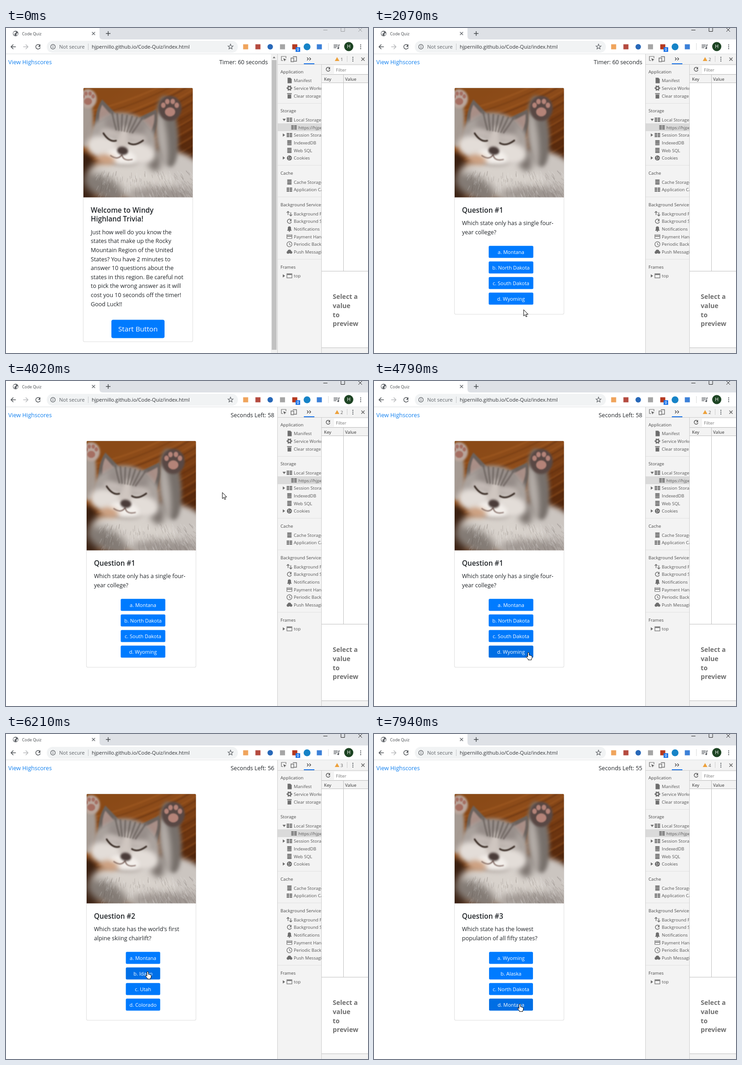
Animation, 790 px wide and 709 px high, one loop 8000 ms. Source, as an HTML page with a canvas:

```html
<!DOCTYPE html>
<html lang="en">
<head>
<meta charset="utf-8">
<title>Code Quiz</title>
<style>
html, body { margin: 0; width: 100%; height: 100%; overflow: hidden; background: #fff; }
canvas { display: block; }
</style>
</head>
<body>
<canvas id="stage" width="790" height="709"></canvas>
<script>
const LOOP = 8000, START = 1990, FIRST_SECOND = 3010;
const INK = '#212529', GREY = '#6e6e6e', CHROME = '#5f6368', PANEL = '#f3f3f3', RULE = '#cdcdcd';
const BODY = 12.55, HEADING = 15.3, LEADING = 19.6, UI = 9.65;
let c = document.getElementById('stage').getContext('2d');

const INTRO = ['Just how well do you know the', 'states that make up the Rocky', 'Mountain Region of the United',
  'States? You have 2 minutes to', 'answer 10 questions about the', 'states in this region. Be careful not',
  'to pick the wrong answer as it will', 'cost you 10 seconds off the timer!', 'Good Luck!!'];
const QUESTIONS = [
  { at: START, lines: ['Which state only has a single four-', 'year college?'],
    answers: ['a. Montana', 'b. North Dakota', 'c. South Dakota', 'd. Wyoming'] },
  { at: 5450, lines: ["Which state has the world's first", 'alpine skiing chairlift?'],
    answers: ['a. Montana', 'b. Idaho', 'c. Utah', 'd. Colorado'] },
  { at: 6540, lines: ['Which state has the lowest', 'population of all fifty states?'],
    answers: ['a. Wyoming', 'b. Alaska', 'c. North Dakota', 'd. Montana'] }
];
const MOVES = [
  { from: 280, to: 1050, x: 312, y: 649, bow: 70 },
  { from: START, to: 2780, x: 528, y: 118 },
  { from: 2780, to: 3010, x: 527, y: 79 },
  { from: 3220, to: 3410, x: 529, y: 94 },
  { from: 3560, to: 4730, x: 337, y: 592 },
  { from: 4800, to: 5040, x: 322, y: 588 },
  { from: 5700, to: 6210, x: 309, y: 518 },
  { from: 7290, to: 7940, x: 318, y: 589 }
];

const asked = t => QUESTIONS.filter(q => t >= q.at).length;

function pointer(t) {
  if (t < MOVES[0].from) return null;
  let p = { x: 654, y: 698 };
  for (const m of MOVES) {
    const u = Math.min(1, Math.max(0, (t - m.from) / (m.to - m.from)));
    const k = u * (.6 + .4 * u);
    p = { x: p.x + (m.x - p.x) * k, y: p.y + (m.y - p.y) * k - (m.bow || 0) * Math.sin(Math.PI * k) };
  }
  return p;
}

const within = (p, b) => p && p.x >= b.x && p.x < b.x + b.w && p.y + 3 >= b.y && p.y + 3 < b.y + b.h;

// Share of the last 150 ms that the pointer spent on the button
function hoverLevel(b, t) {
  let hits = 0;
  for (let i = 0; i < 10; i++) hits += within(pointer(t - i * 15), b) ? 1 : 0;
  return hits / 10;
}

function font(size, weight = 400) { c.font = `${weight} ${size}px "Open Sans", "Noto Sans", sans-serif`; }
function text(s, x, y, size, color = INK, weight = 400, align = 'left') {
  font(size, weight);
  c.fillStyle = color;
  c.textAlign = align;
  c.fillText(s, x, y);
}
function lines(list, x, y, size, color, weight) {
  list.forEach((s, i) => text(s, x, y + i * LEADING, size, color, weight));
}
function rect(x, y, w, h, color) { c.fillStyle = color; c.fillRect(x, y, w, h); }
function pill(x, y, w, h, r, color) { c.beginPath(); c.roundRect(x, y, w, h, r); c.fillStyle = color; c.fill(); }
function disc(x, y, r, color) { c.beginPath(); c.arc(x, y, r, 0, 7); c.fillStyle = color; c.fill(); }
function shape(d, x, y, fill, stroke, width = 1) {
  const p = new Path2D(d);
  c.save();
  c.translate(x, y);
  if (fill) { c.fillStyle = fill; c.fill(p); }
  if (stroke) { c.strokeStyle = stroke; c.lineWidth = width; c.stroke(p); }
  c.restore();
}
const line = (d, x, y, color, width = 1.4) => shape(d, x, y, null, color, width);
function cross(x, y, r, color, width) { line(`M${-r} ${-r}L${r} ${r}M${r} ${-r}L${-r} ${r}`, x, y, color, width); }
function kebab(x, y) { for (let d = -4; d <= 4; d += 4) disc(x, y + d, 1.2, CHROME); }
function reload(x, y, r, color) {
  c.beginPath();
  c.arc(x, y, r, .3, 5.5);
  c.strokeStyle = color;
  c.lineWidth = 1.5;
  c.stroke();
  shape(`M${r} ${-r - 1}V0H0Z`, x, y, color);
}

function layer(w, h, paint) {
  const el = document.createElement('canvas');
  el.width = w; el.height = h;
  const previous = c;
  c = el.getContext('2d');
  paint();
  c = previous;
  return el;
}

function random(seed) { return () => (seed = seed * 16807 % 2147483647) / 2147483647; }

function soft(x, y, rx, ry, color, blur = 4, turn = 0) {
  c.filter = `blur(${blur}px)`;
  c.beginPath();
  c.ellipse(x, y, rx, ry, turn, 0, 7);
  c.fillStyle = color;
  c.fill();
  c.filter = 'none';
}

function paw(x, y, r, color, pad) {
  soft(x, y, r, r * 1.1, color, 2);
  soft(x, y + r * .3, r * .45, r * .4, pad, 1);
  for (let a = -2.7; a < 0; a += .75) soft(x + r * .65 * Math.cos(a), y + r * .65 * Math.sin(a), r * .2, r * .24, pad, 1);
}

function face() {
  c.save();
  c.translate(86, 112);
  c.rotate(.18);
  for (const side of [-1, 1]) {
    c.filter = 'blur(1.5px)';
    shape('M14-44L60-77Q72-48 64-14Z', 0, 0, '#6b625d');
    shape('M34-47L58-66Q63-46 57-28Z', 0, 0, '#a98f87');
    c.scale(-1, 1);
  }
  c.filter = 'none';
  soft(0, 2, 74, 56, '#aba39e');
  soft(0, -32, 46, 24, '#968d89', 6);
  for (const side of [-1, 1]) {
    soft(side * 38, 24, 38, 24, '#e3ddd8', 6);
    soft(side * 30, -8, 22, 9, '#c3bab5', 4);
  }
  soft(0, 12, 13, 42, '#cfc6c0', 5);
  soft(4, 38, 32, 16, '#f3efeb', 4);
  soft(-28, 50, 20, 10, '#cfa180', 6);
  c.filter = 'blur(1px)';
  c.lineCap = 'round';
  for (let i = -3; i <= 3; i++) line(`M${i * 11} -52Q${i * 9} -36 ${i * 6} -18`, 0, 0, '#645b5799', 4);
  for (const side of [-1, 1]) {
    line(`M${side * 44} -5Q${side * 28} 12 ${side * 14} 6`, 0, 0, '#33261f', 3.5);
    line(`M4 34Q${4 + side * 6} 48 ${4 + side * 24} 40`, 0, 0, '#6b5048', 2);
  }
  c.filter = 'none';
  soft(4, 25, 12, 9, '#4a3c39', 2);
  c.restore();
}

const photo = layer(239, 239, () => {
  const rnd = random(7);
  const wood = c.createLinearGradient(70, 0, 190, 200);
  ['#8a4a17', '#8f4d1b', '#6b3410', '#3f1d0a'].forEach((s, i) => wood.addColorStop(i / 3, s));
  rect(0, 0, 239, 239, wood);
  c.filter = 'blur(1.5px)';
  for (let i = 0; i < 28; i++) {
    const y = i * 10 - 20 + rnd() * 8;
    line(`M20 ${y + 70}Q140 ${y + 40} 245 ${y - 25}`, 0, 0, i % 2 ? '#4a210a66' : '#b4692a55', 1 + rnd() * 3);
  }
  c.filter = 'none';
  soft(0, 200, 30, 60, '#3a2011', 6);
  soft(4, 70, 17, 60, '#a59a92', 3);
  paw(10, 24, 19, '#b9a59b', '#a56f62');
  soft(175, 198, 90, 62, '#cbc5c0', 6);
  soft(105, 200, 95, 42, '#d8d2cc', 8, .15);
  soft(183, 95, 23, 78, '#77706b', 4, -.1);
  soft(172, 112, 11, 60, '#b3aca7', 6, -.1);
  paw(189, 45, 25, '#594844', '#b48378');
  soft(150, 150, 16, 34, '#7b736e', 7, -.3);
  face();
  soft(45, 218, 48, 24, '#837b75', 9, .5);
  soft(175, 232, 80, 16, '#99918c', 9);
  for (let i = 0; i < 220; i++) {
    const x = 30 + rnd() * 209, y = 180 + rnd() * 60;
    line(`M0 0l${(x - 90) / 20 + rnd() * 4 - 2} ${6 + rnd() * 7}`, x, y, i % 2 ? '#ffffff33' : '#635b5633', 1.2);
  }
});

const ICONS = {
  file: (x, y) => shape('M-4-6H2L5-3V6H-4Z', x, y, GREY),
  gear: (x, y) => {
    for (let a = 0; a < 6; a++) line(`M0 0L${6 * Math.cos(a * Math.PI / 3)} ${6 * Math.sin(a * Math.PI / 3)}`, x, y, GREY, 3);
    disc(x, y, 4.5, GREY);
    disc(x, y, 2, PANEL);
  },
  trash: (x, y) => { rect(x - 5, y - 5.5, 10, 2, GREY); rect(x - 4, y - 2.5, 8, 8.5, GREY); },
  grid: (x, y) => { for (let i = 0; i < 6; i++) rect(x - 6 + (i % 2) * 6.5, y - 4.5 + (i >> 1) * 3.3, 5.5, 2.5, GREY); },
  db: (x, y) => { for (let i = 0; i < 4; i++) pill(x - 5, y - 5.5 + i * 2.9, 10, 2.3, 1.2, GREY); },
  cookie: (x, y) => {
    disc(x, y, 5.5, GREY);
    for (let a = 0; a < 6; a += 2) disc(x + 2.4 * Math.cos(a), y + 2.4 * Math.sin(a), 1.1, PANEL);
  },
  swap: (x, y) => line('M-3 3V-5M-6-2L-3-5L0-2M3-3V5M0 2L3 5L6 2', x, y, GREY),
  sync: (x, y) => reload(x, y, 4.5, GREY),
  bell: (x, y) => { shape('M-5 4L-3.5 1V-2A3.5 3.5 0 0 1 3.5-2V1L5 4Z', x, y, GREY); disc(x, y + 5, 1.3, GREY); },
  card: (x, y) => { line('M-5.5-4H5.5V4H-5.5Z', x, y, GREY, 1.2); rect(x - 5, y - 2, 10, 2, GREY); },
  clock: (x, y) => line('M5.5 0A5.5 5.5 0 1 1 5.5-.1M0-3V0L2.5 2', x, y, GREY, 1.2),
  cloud: (x, y) => { disc(x - 3, y + 1, 3, GREY); disc(x, y - 1, 4, GREY); disc(x + 3.5, y + 1.2, 2.8, GREY); },
  frame: (x, y) => { line('M-5.5-4.5H5.5V4.5H-5.5Z', x, y, GREY, 1.2); rect(x - 5, y - 4, 10, 2, GREY); }
};
// A leading "v" marks an open entry, ">" a closed one, "-" a selected child
const MENU = {
  'Application': ['file Manifest', 'gear Service Workers', 'trash Clear storage'],
  'Storage': ['vgrid Local Storage', '-grid https://hjpernillo.github.io', '>grid Session Storage', 'db IndexedDB', 'db Web SQL', '>cookie Cookies'],
  'Cache': ['db Cache Storage', 'grid Application Cache'],
  'Background Services': ['swap Background Fetch', 'sync Background Sync', 'bell Notifications', 'card Payment Handler',
    'clock Periodic Background Sync', 'cloud Push Messaging'],
  'Frames': ['>frame top']
};

function drawMenu() {
  c.save();
  c.beginPath();
  c.rect(593, 80, 95, 629);
  c.clip();
  let y = 95;
  for (const [title, items] of Object.entries(MENU)) {
    if (y > 95) rect(593, Math.round(y - 17), 96, 1, '#e2e2e2');
    text(title, 599, y + 3.7, UI, '#484848');
    y += 19.4;
    for (const item of items) {
      const [, mark, icon, label] = item.match(/^([v>-]?)(\w+) (.*)/);
      const shift = mark === '-' ? 10 : 0;
      if (shift) rect(593, Math.round(y - 8.5), 96, 17, '#dadada');
      ICONS[icon](618.5 + shift, y);
      if (mark === 'v') shape('M-3.5-2H3.5L0 3Z', 607, y, GREY);
      if (mark === '>') shape('M-2-3.5L3 0L-2 3.5Z', 606, y, GREY);
      text(label, 628 + shift, y + 3.7, UI, '#555');
      y += 16.7;
    }
    y += 16.2;
  }
  c.restore();
}

function drawDevtools() {
  rect(592, 57, 198, 652, PANEL);
  rect(592, 57, 1, 652, RULE);
  line('M-1 4H-5V-5H5V-1', 606, 67, GREY, 1.2);
  shape('M0 0L7 3L4 4L3 7Z', 605, 66, '#5a5a5a');
  line('M-2-5H6V5H1M-6-2H0V6H-6Z', 628, 67.5, GREY);
  line('M-4-3L-1 0L-4 3M1-3L4 0L1 3', 661, 67.5, '#444');
  rect(650, 77, 23, 2, '#1a73e8');
  shape('M0-4.5L5 4H-5Z', 722.5, 68, '#eda13b');
  rect(744, 61, 1, 13, RULE);
  kebab(757, 68);
  cross(779, 68, 3.5, '#5a5a5a', 1.4);
  rect(593, 79, 197, 1, RULE);
  drawMenu();

  rect(689, 120, 101, 577, '#fff');
  rect(688, 80, 1, 629, RULE);
  rect(716, 82, 74, 18, '#fff');
  reload(703, 90, 4.2, '#5a5a5a');
  for (const y of [101, 119, 530, 697]) rect(689, y, 101, 1, '#c0c0c0');
  rect(736, 102, 1, 428, '#c0c0c0');
  text('Filter', 720, 94.7, UI, '#757575');
  text('Key', 694, 114.7, UI, '#333');
  text('Value', 740, 114.7, UI, '#333');
  lines(['Select a', 'value', 'to', 'preview'], 713, 591.3, 14.2, GREY, 700);
}

function drawBrowser() {
  rect(0, 0, 790, 709, '#fff');
  rect(0, 0, 790, 25, '#dee1e6');
  shape('M0 0H204V18Q204 25 211 25H0Z', 0, 0, '#fff');
  disc(21, 12, 6, CHROME);
  shape('M-5-2Q-2-5 1-4L0-1L-3 1L-1 4Q-4 4-5 0ZM2 0L5-1Q5 3 2 5Z', 21, 12, '#fff');
  text('Code Quiz', 35, 15.5, 8.9, '#45494d');
  cross(191, 12, 3.3, CHROME, 1.3);
  line('M-5 0H5M0-5V5', 223, 12, '#45494d', 1.5);
  rect(0, 56, 790, 1, '#dcdee0');

  const arrow = 'M5.5 0H-5M0-5L-5 0L0 5';
  line(arrow, 16, 41, '#54585c', 1.6);
  c.save();
  c.scale(-1, 1);
  line(arrow, -43, 41, '#babcbe', 1.6);
  c.restore();
  reload(70, 41, 5, '#54585c');
  pill(89, 28, 417, 26, 13, '#f1f3f4');
  line('M5 0A5 5 0 1 1 5-.1M0-.5V2.8M0-3V-1.6', 102.5, 41, CHROME, 1.3);
  text('Not secure', 116, 45, 11.06, CHROME);
  rect(179, 34, 1, 14, '#c5c8cb');
  text('hjpernillo.github.io/Code-Quiz/index.html', 187, 45, 11.06, '#303236');
  let star = 'M';
  for (let i = 0; i < 10; i++) {
    const r = i % 2 ? 2.5 : 5.8, a = i * Math.PI / 5;
    star += `${i ? 'L' : ''}${r * Math.sin(a)} ${-r * Math.cos(a)}`;
  }
  line(star + 'Z', 490, 41, CHROME, 1.2);

  ['#f0a45c', '#b54b40', '#2868b8', '#a5a5a5', '#b53a20', '#1683c7', '#3c80d8'].forEach((color, i) => {
    const x = 523 + i * 26.8;
    if (i === 2 || i === 5) disc(x, 41, 5 + i / 2, color);
    else rect(x - 5.5, 35.5, 11, 11, color);
  });
  rect(632, 42, 10, 10, '#1a73e8');
  text('0', 637, 50.3, 8, '#fff', 600, 'center');
  rect(703, 33, 1, 15, '#d8dadc');
  line('M-6-4H3M-6-1H3M-6 2H0M5 3V-4H7.5', 721, 41, CHROME, 1.5);
  disc(725, 44, 2, CHROME);
  disc(748, 40.5, 10, '#1d4423');
  text('H', 748, 44.4, 10.5, '#fff', 400, 'center');
  kebab(774, 41);
}

const backdrop = layer(790, 709, () => { drawBrowser(); drawDevtools(); });

function drawCard(x, bottom) {
  pill(x, 130, 240, bottom - 130, 3.5, '#dfdfdf');
  pill(x + 1, 131, 238, bottom - 132, 3, '#fff');
  c.save();
  c.beginPath();
  c.roundRect(x + 1, 130.5, 238.5, 239, [3, 3, 0, 0]);
  c.clip();
  c.drawImage(photo, x + 1, 130.5);
  c.restore();
}

function buttonsAt(t) {
  if (t < START) return [{ x: 230, y: 636.5, w: 116, h: 40, label: 'Start Button', size: 15.2, r: 4 }];
  const { answers } = QUESTIONS[asked(t) - 1], size = 10.95;
  font(size);
  const w = 16 + Math.max(...answers.map(s => c.measureText(s).width));
  return answers.map((label, i) => ({ x: 299 - w / 2, y: 475.3 + 34 * i, w, h: 26.3, label, size, r: 2.5 }));
}

function drawButton(b, t) {
  const k = hoverLevel(b, t);
  pill(b.x, b.y, b.w, b.h, b.r, `rgb(0,${123 - 18 * k},${255 - 38 * k})`);
  text(b.label, b.x + b.w / 2, b.y + b.h / 2 + b.size * .37, b.size, '#fff', 400, 'center');
}

function drawPage(t) {
  const n = asked(t);
  const left = 59 - Math.floor((t - FIRST_SECOND) / 1000);
  const timer = t < FIRST_SECOND ? 'Timer: 60 seconds' : 'Seconds Left: ' + left;
  text('View Highscores', 5, 78.5, BODY, '#1482f0');
  text(timer, n ? 585.5 : 571.5, 78.5, BODY, INK, 400, 'right');
  if (n) {
    drawCard(175, 625);
    text('Question #' + n, 192, 402.5, HEADING, INK, 600);
    lines(QUESTIONS[n - 1].lines, 192, 430.3, BODY);
  } else {
    rect(578, 57, 14, 652, '#f1f1f1');
    rect(580, 70, 10.5, 632, '#c1c1c1');
    shape('M-3 2L0-2L3 2Z', 585, 64, '#777');
    drawCard(168, 685);
    lines(['Welcome to Windy', 'Highland Trivia!'], 185, 402.5, HEADING, INK, 600);
    lines(INTRO, 185, 449.8, BODY);
  }
}

function drawPointer(t, buttons) {
  const p = pointer(t);
  if (!p) return;
  const timerArea = { x: 485, y: 66, w: 101, h: 24 };
  if (buttons.some(b => within(p, b)))
    shape('M-1.5 1Q0-.8 1.5 1V6L6 7L8 9V11Q8 13 6.5 15V16.5H-.5V15Q-3 12.5-4.8 9.5Q-4.3 7.6-1.5 10Z', p.x, p.y, '#fff', '#000');
  else if (within(p, timerArea))
    line('M-3-7H3M0-7V7M-3 7H3', p.x, p.y, '#222', 1.3);
  else
    shape('M.5.5V14L3.5 11.2L5.6 16L7.8 15L5.7 10.4H10Z', p.x, p.y, '#fff', '#000');
}

function drawWindowControls(t) {
  const ink = t < 1910 ? '#9a9c9f' : '#222';
  line('M-4.5 0H4.5', 697, 4.5, ink, 1);
  line('M-4-5H4V3.5H-4Z', 735, 4, ink, 1);
  cross(773, 4, 4, ink, 1);
}

function draw(t) {
  c.drawImage(backdrop, 0, 0);
  drawWindowControls(t);
  text(String(1 + asked(t)), 730, 71.7, UI, '#5a5a5a');
  drawPage(t);
  const buttons = buttonsAt(t);
  buttons.forEach(b => drawButton(b, t));
  drawPointer(t, buttons);
}

const began = performance.now();
function tick() {
  draw((performance.now() - began) % LOOP);
  requestAnimationFrame(tick);
}
tick();
</script>
</body>
</html>
```
